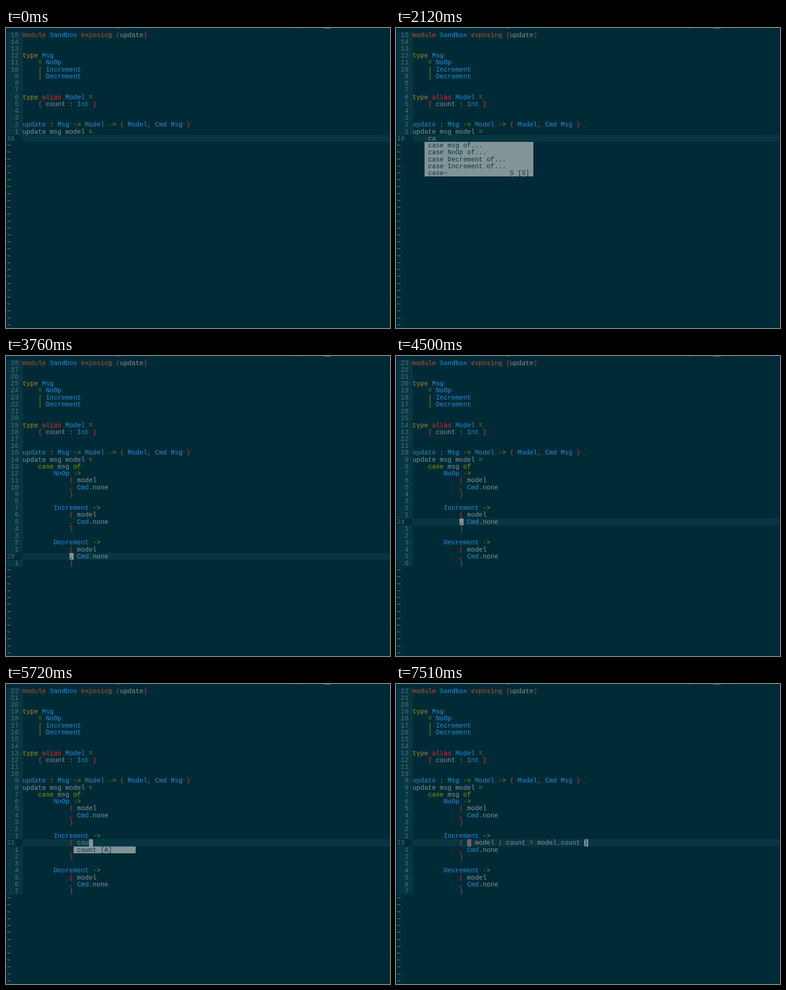
An HTML page with a canvas for the animation above (8000 ms loop, 847 by 661 pixels).

```html
<!DOCTYPE html>
<html lang="en">
<head>
<meta charset="utf-8">
<title>Editor completion</title>
<style>
html, body { margin: 0; width: 100%; height: 100%; overflow: hidden; background: #002b36; }
canvas { display: block; }
</style>
</head>
<body>
<canvas id="stage" width="847" height="661"></canvas>
<script>
const ctx = document.getElementById('stage').getContext('2d');
const LOOP = 8000, LEFT = 36.9, TOP = 7.6, CELL = 8.6, ROW = 15.22, ROWS = 43;
const FONT = '14.33px "Liberation Mono", monospace';
const C = {
  back: '#002b36', bar: '#073642', dim: '#586e75', faint: '#657b83', text: '#839496',
  pale: '#eee8d5', yellow: '#b58900', orange: '#cb4b16', red: '#dc322f', blue: '#268bd2', green: '#859900'
};

const head = `module Sandbox exposing (update)


type Msg
    = NoOp
    | Increment
    | Decrement


type alias Model =
    { count : Int }


update : Msg -> Model -> ( Model, Cmd Msg )
update msg model =`.split('\n');

const pad = n => ' '.repeat(n);
const record = '{ model | count = model.count }';
const branch = (name, value = 'model') =>
  [`${pad(8)}${name} ->`, `${pad(12)}( ${value}`, `${pad(12)}, Cmd.none`, `${pad(12)})`];
const formatted = value => [
  '    case msg of', ...branch('NoOp'), '', ...branch('Increment', value), '', ...branch('Decrement')
];
const inlineBranch = name => `${name} ->^M${pad(12)}( model^M${pad(12)}, Cmd.none^M`;
const wrapped = [
  `    case msg of^M${pad(8)}${inlineBranch('NoOp')}`,
  `↪)^M    ^M${pad(8)}${inlineBranch('Increment')}`,
  `↪)^M    ^M${pad(8)}${inlineBranch('Decrement')}${pad(12)})`
];

const caseMenu = {
  row: 16, col: 3, width: 28, selected: -1,
  items: ['case msg of...', 'case NoOp of...', 'case Decrement of...', 'case Increment of...', 'case~' + pad(16) + 'S [S]']
};
const countMenu = { row: 23, col: 13, width: 16, selected: -1, items: ['count [A]'] };
const recordMenu = { ...countMenu, width: 37, items: ['count' + pad(27) + '[A]', record + ' [A]'] };

// Each step changes only the listed parts of the editor state.
const steps = [
  [0, { body: [''], row: 15, col: 4, span: 1, cursor: false, menu: null }],
  [440, { cursor: true }],
  [1440, { body: ['    c'], cursor: false }],
  [1490, { col: 5, cursor: true }],
  [1680, { body: ['    ca'], cursor: false }],
  [1740, { menu: caseMenu }],
  [1810, { col: 6, cursor: true }],
  [2120, { cursor: false }],
  [2200, { body: wrapped, span: 3, col: 90, cursor: true, menu: { ...caseMenu, row: 18, selected: 0 } }],
  [2590, { menu: null, cursor: false }],
  [2640, { cursor: true }],
  [2690, { body: formatted(), span: 1, row: 29, col: 12, cursor: false }],
  [2750, { cursor: true }],
  [3760, { row: 28 }],
  [3990, { row: 27 }],
  [4080, { row: 26 }],
  [4170, { row: 25 }],
  [4360, { row: 24 }],
  [4500, { row: 23 }],
  [4630, { row: 22 }],
  [4700, { cursor: false }],
  [4780, { col: 14, cursor: true }],
  [4960, { cursor: false }],
  [5030, { cursor: true }],
  [5280, { body: formatted(''), cursor: false }],
  [5340, { cursor: true }],
  [5560, { body: formatted('c') }],
  [5610, { body: formatted('co'), col: 16 }],
  [5660, { body: formatted('cou'), cursor: false, menu: countMenu }],
  [5720, { col: 17, cursor: true }],
  [5840, { menu: recordMenu }],
  [6020, { body: formatted('count'), col: 19, menu: { ...recordMenu, selected: 0 } }],
  [6400, { body: formatted(record), col: 45, menu: { ...recordMenu, selected: 1 } }],
  [7040, { menu: null, cursor: false }],
  [7110, { cursor: true }],
  [7190, { col: 44 }],
  [7440, { cursor: false }],
  [7510, { cursor: true }]
];
let state = {};
const timeline = steps.map(([time, change]) => ({ time, ...(state = { ...state, ...change }) }));

const x = col => LEFT + col * CELL;
const y = row => TOP + row * ROW;

function box(left, top, right, bottom, color) {
  left = Math.round(left);
  top = Math.round(top);
  ctx.fillStyle = color;
  ctx.fillRect(left, top, Math.round(right) - left, Math.round(bottom) - top);
}

function cells(row, col, width, color) {
  box(x(col), y(row), x(col + width), y(row + 1), color);
}

function write(row, col, text, color) {
  ctx.fillStyle = color;
  ctx.fillText(text, x(col) - 0.5, Math.round(y(row) + 12));
}

const tokens = /\^M|->|update(?= :)|\w+|[^\s\w]/g;
const words = { module: C.orange, exposing: C.orange, type: C.yellow, alias: C.red, case: C.green, of: C.green };

function tokenColor(token, line, index) {
  if (token === '^M') return C.back;
  if (token === '↪') return C.faint;
  if (words[token]) return words[token];
  if (/^[A-Z]/.test(token) || (token === 'update' && line.startsWith(' :', index + 6))) return C.blue;
  if (/^[(){},]$/.test(token)) return C.red;
  if (/^(->|[=|:])$/.test(token)) return C.green;
  return token === '.' && line.startsWith('Cmd', index - 3) ? C.green : C.text;
}

function writeCode(row, line) {
  for (const { 0: token, index } of line.matchAll(tokens)) {
    if (token === '^M') cells(row, index, 2, C.yellow);
    write(row, index, token, tokenColor(token, line, index));
  }
}

function bracketPartner(lines, row, col) {
  const char = lines[row][col];
  if (char === '(') return [row + 2, col];
  if (char === ')') return [row - 2, col];
  if (char === '}') return [row, lines[row].indexOf('{')];
}

function drawCursor(lines, { row, col, span, cursor }) {
  const line = lines[row];
  if (line === '' && row !== 15) col = 0;
  const partner = span === 1 && (bracketPartner(lines, row, col) ||
    (line[col - 1] === '}' && bracketPartner(lines, row, col - 1)));
  if (partner) {
    cells(...partner, 1, C.dim);
    write(...partner, lines[partner[0]][partner[1]], C.red);
  }
  if (!cursor) return;
  const cursorRow = row + span - 1;
  cells(cursorRow, col, 1, C.text);
  write(cursorRow, col, lines[cursorRow][col] || '', C.back);
}

function drawMenu({ row, col, width, items, selected }) {
  items.forEach((item, i) => {
    const active = i === selected;
    cells(row + i, col, width, active ? C.dim : C.text);
    write(row + i, col + 1, item, active ? C.pale : C.bar);
  });
}

// Lower edge of the line cut off by the top of the window.
function drawClippedLine() {
  box(162, 0, 164, 1, C.dim);
  box(247, 0, 250, 1, C.yellow);
  box(645, 0, 648, 1, C.dim);
  box(701, 0, 708, 1, C.text);
  box(709, 0, 716, 1, C.text);
}

function draw(view) {
  const lines = [...head, ...view.body];
  const { row: current, span } = view;
  box(0, 0, 847, 661, C.back);
  drawClippedLine();
  box(2, TOP, LEFT, y(lines.length), C.bar);
  box(2, y(current), LEFT, y(current + span), C.back);
  box(LEFT, y(current), 846, y(current + span), C.bar);
  for (let row = 0; row < ROWS; row++) {
    if (row >= lines.length) {
      write(row, -4, '~', C.text);
      continue;
    }
    if (row === current) write(row, -4, String(row + 1), C.dim);
    else if (row < current || row >= current + span) {
      write(row, -4, String(Math.abs(row - current)).padStart(3), C.dim);
    }
    writeCode(row, lines[row]);
  }
  drawCursor(lines, view);
  if (view.menu) drawMenu(view.menu);
}

const start = performance.now();
function tick() {
  const time = (performance.now() - start) % LOOP;
  ctx.font = FONT;
  draw(timeline.findLast(step => step.time <= time));
  requestAnimationFrame(tick);
}
tick();
</script>
</body>
</html>
```
